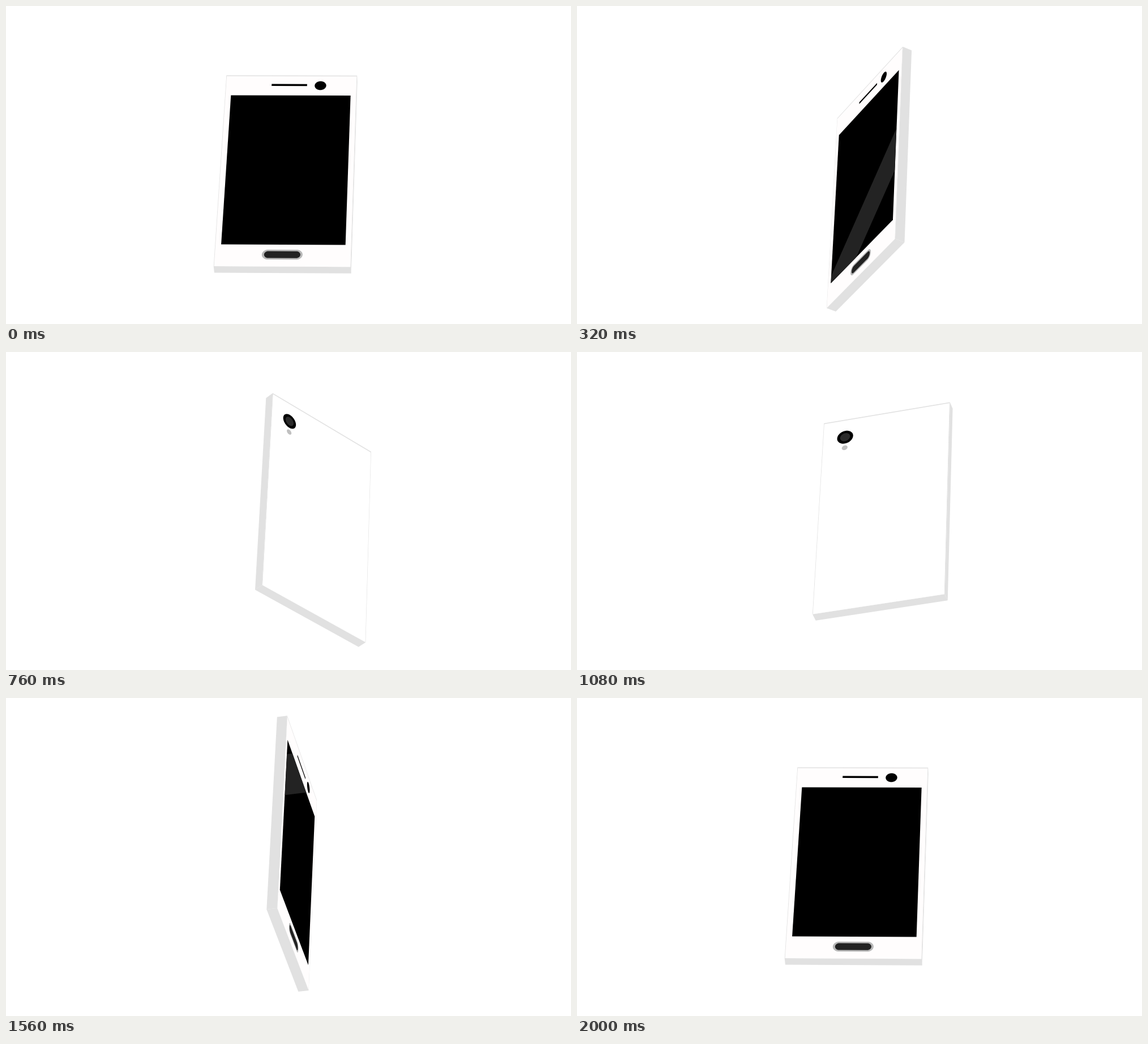
An HTML page with a canvas for the animation above (6040 ms loop, 998 by 561 pixels).

```html
<!DOCTYPE html>
<html lang="en">
<head>
<meta charset="utf-8">
<title>Turning phone</title>
<style>
  html, body { margin: 0; width: 100%; height: 100%; overflow: hidden; background: #fff; }
  canvas { display: block; }
</style>
</head>
<body>
<canvas id="stage" width="998" height="561"></canvas>
<script>
const ctx = document.getElementById('stage').getContext('2d');
const LOOP = 6040, STEP = 40, STEPS = 50;
const DEG = Math.PI / 180;

// Body in its own space: y points up, the spin axis lies in the front plane.
const LEFT = -143.3, RIGHT = 93.7, TOP = 216.5, BOTTOM = -216.5, BACK = -18.6;
const SCREEN = { left: -132.7, right: 83.1, top: 169, bottom: -169 };

const CENTER = { x: 521.2, y: 287 };
const FOCAL = 5500, TILT = 38.8 * DEG, ROLL = 2.65 * DEG;
const START_ANGLE = 3.9 * DEG;
const SIDE = '#e1e1e1';

let angle = 0;

function project([x, y, z]) {
  const spunX = x * Math.cos(angle) - z * Math.sin(angle);
  const spunZ = x * Math.sin(angle) + z * Math.cos(angle);
  const up = y * Math.cos(TILT) + spunZ * Math.sin(TILT);
  const near = spunZ * Math.cos(TILT) - y * Math.sin(TILT);
  const scale = FOCAL / (FOCAL - near);
  const px = spunX * scale, py = -up * scale;
  return [
    CENTER.x + px * Math.cos(ROLL) - py * Math.sin(ROLL),
    CENTER.y + px * Math.sin(ROLL) + py * Math.cos(ROLL)
  ];
}

function trace(points) {
  ctx.beginPath();
  points.forEach(p => ctx.lineTo(...project(p)));
  ctx.closePath();
}

function fill(points, color) {
  trace(points);
  ctx.fillStyle = color;
  ctx.fill();
}

// Corners listed clockwise as seen from outside.
function facesViewer(points) {
  const [a, b, c] = points.map(project);
  return (b[0] - a[0]) * (c[1] - a[1]) - (b[1] - a[1]) * (c[0] - a[0]) > 0;
}

const rect = (l, t, r, b, z) => [[l, t, z], [r, t, z], [r, b, z], [l, b, z]];

// A circle, or a capsule when stretched sideways.
function round(cx, cy, radius, z, stretch = 0) {
  return Array.from({ length: 64 }, (_, i) => {
    const a = (i + 0.5) / 64 * 2 * Math.PI;
    const side = Math.sign(Math.cos(a)) * stretch;
    return [cx + side + radius * Math.cos(a), cy + radius * Math.sin(a), z];
  });
}

function drawGlare(step) {
  const { left, right, top, bottom } = SCREEN;
  const rise = 0.555, thickness = 0.28;
  const edge = -thickness + 0.154 * (step % 36.55);
  const at = (x, v) => [x, top + (bottom - top) * v, 0];
  ctx.save();
  trace(rect(left, top, right, bottom, 0));
  ctx.clip();
  fill([
    at(left, edge), at(right, edge - rise),
    at(right, edge - rise + thickness), at(left, edge + thickness)
  ], '#232323');
  ctx.restore();
}

function drawFront(step) {
  fill(rect(LEFT + 0.8, TOP - 2.2, RIGHT - 0.8, BOTTOM, 0), '#fffdfd');
  fill(rect(SCREEN.left, SCREEN.top, SCREEN.right, SCREEN.bottom, 0), '#000');
  drawGlare(step);
  fill(rect(-60.2, 196, 3.9, 191.4, 0), '#000');
  fill(round(28.1, 192.4, 10.4, 0), '#000');
  fill(round(-25.8, -190.7, 10.8, 0, 24.5), '#b8b8b8');
  fill(round(-25.8, -190.7, 7.5, 0, 23.9), '#222');
}

function drawBack() {
  fill(rect(LEFT + 0.8, TOP - 2.2, RIGHT - 0.8, BOTTOM, BACK), '#fff');
  fill(round(51.7, 174.7, 15, BACK), '#000');
  fill(round(51.7, 174.7, 9.4, BACK), '#2b2b2b');
  fill(round(51.5, 149.8, 5.4, BACK), '#c0c0c0');
}

const front = rect(LEFT, TOP, RIGHT, BOTTOM, 0);
const back = rect(RIGHT, TOP, LEFT, BOTTOM, BACK);
const sides = [
  [[RIGHT, TOP, 0], [RIGHT, TOP, BACK], [RIGHT, BOTTOM, BACK], [RIGHT, BOTTOM, 0]],
  [[LEFT, TOP, BACK], [LEFT, TOP, 0], [LEFT, BOTTOM, 0], [LEFT, BOTTOM, BACK]],
  [[LEFT, BOTTOM, 0], [RIGHT, BOTTOM, 0], [RIGHT, BOTTOM, BACK], [LEFT, BOTTOM, BACK]]
];

function draw(time) {
  const step = Math.min(Math.floor(time / STEP), STEPS);
  angle = START_ANGLE + step / STEPS * 2 * Math.PI;
  ctx.fillStyle = '#fff';
  ctx.fillRect(0, 0, 998, 561);
  [...sides, front, back].filter(facesViewer).forEach(face => fill(face, SIDE));
  if (facesViewer(front)) drawFront(step);
  if (facesViewer(back)) drawBack();
}

function tick() {
  draw(performance.now() % LOOP);
  requestAnimationFrame(tick);
}
tick();
</script>
</body>
</html>
```
